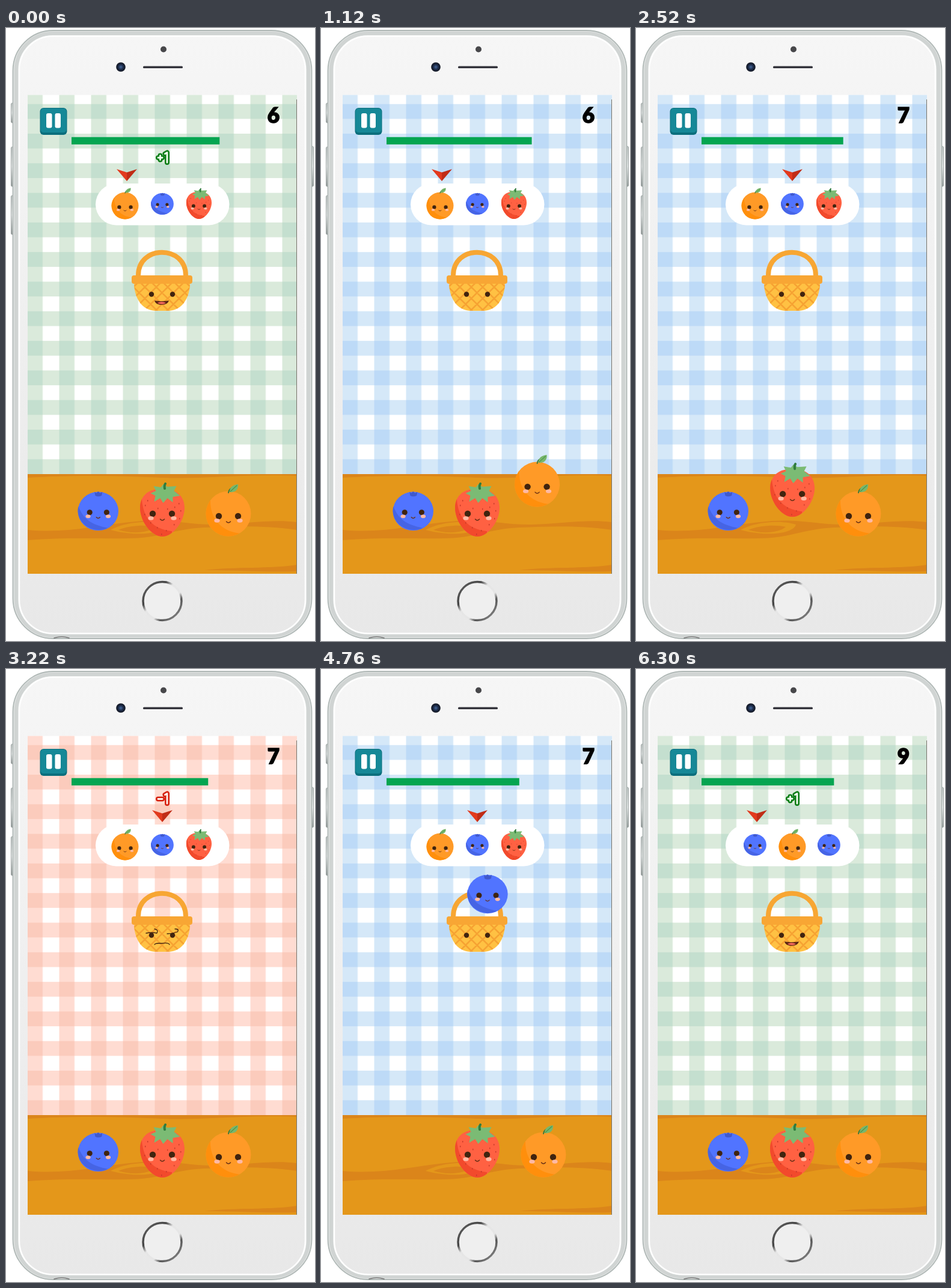
An HTML page that plays this animation: 514 px wide and 1021 px high, repeating every 6370 ms.

```html
<!DOCTYPE html>
<html lang="en">
<head>
<meta charset="utf-8">
<title>Fruit basket game</title>
<style>
html, body { margin: 0; width: 100%; height: 100%; overflow: hidden; background: #fff; }
svg { display: block; }
#game { --light: #d5e8f8; --dark: #bddaf7; }
#game.good { --light: #daeadb; --dark: #c4dfcf; }
#game.bad { --light: #ffdcd2; --dark: #fbcbbc; }
.good .happy, .bad .angry { visibility: visible; }
.happy, .angry { visibility: hidden; }
text { font-family: Lato, sans-serif; font-weight: 900; text-anchor: middle; }
.line { fill: none; stroke-linecap: round; stroke-linejoin: round; }
</style>
</head>
<body>
<svg id="game" width="514" height="1021" viewBox="0 0 514 1021">
<defs>
  <linearGradient id="face" x2="0" y2="1"><stop stop-color="#f6f6f6"/><stop offset="1" stop-color="#e8e8e8"/></linearGradient>
  <linearGradient id="ring" x2="1" y2="1">
    <stop stop-color="#666"/><stop offset=".3" stop-color="#444"/><stop offset=".42" stop-color="#e6e6e6"/>
    <stop offset=".62" stop-color="#e6e6e6"/><stop offset=".72" stop-color="#555"/><stop offset="1" stop-color="#999"/>
  </linearGradient>
  <linearGradient id="button" x2="0" y2="1"><stop stop-color="#bfc5c4"/><stop offset=".5" stop-color="#eceeee"/><stop offset="1" stop-color="#8b9291"/></linearGradient>
  <radialGradient id="lens"><stop stop-color="#46699c"/><stop offset=".55" stop-color="#1b2945"/><stop offset="1" stop-color="#11151f"/></radialGradient>
  <pattern id="gingham" x="35.5" y="126.7" width="53" height="49.3" patternUnits="userSpaceOnUse">
    <path d="M0 0H53V24.6H25.5V49.3H0z" style="fill:var(--light)"/>
    <path d="M0 0H25.5V24.6H0z" style="fill:var(--dark)"/>
  </pattern>
  <clipPath id="screen"><path d="M36 111.5H484V909H36z"/></clipPath>
  <path id="bowl" d="M213 424H306C306 448 294 471 269 471H250C225 471 213 448 213 424z"/>
  <clipPath id="bowlClip"><use href="#bowl"/></clipPath>
  <clipPath id="ball"><circle r="37.5"/></clipPath>
  <path id="berry" d="M0 -33C15 -39 37 -28 37 -4C37 20 17 44 0 44C-17 44 -37 20 -37 -4C-37 -28 -15 -39 0 -33z"/>
  <clipPath id="berryClip"><use href="#berry"/></clipPath>
  <path id="plus" d="M253 216h7M256.500 212.500v7"/>
  <path id="minus" d="M253 216.500h7"/>
  <path id="one" d="M264.500 209.500L268 207.500V224"/>

  <g id="smile">
    <circle cx="-16" r="5.2" fill="#40240f"/><circle cx="16" r="5.2" fill="#40240f"/>
    <ellipse cx="-19" cy="7.5" rx="4.6" ry="3.2" fill="#ffb9a4"/><ellipse cx="19" cy="7.5" rx="4.6" ry="3.2" fill="#ffb9a4"/>
    <path class="line" d="M-3.5 9Q0 13 3.5 9" stroke="#693016" stroke-width="1.5"/>
  </g>
  <g id="orange">
    <circle r="37.5" fill="#ff9a27"/>
    <path clip-path="url(#ball)" d="M-40 -24H-30C-31 8 -13 29 20 33V40H-40z" fill="#ff8f0c"/>
    <path class="line" d="M0 -35Q1 -41 6 -43" stroke="#3b7a3b" stroke-width="2"/>
    <path d="M2 -36C2 -45 8 -48 16 -49C17 -40 11 -35 2 -36z" fill="#78b76c"/>
    <path class="line" d="M3 -37L14 -47" stroke="#4e9550" stroke-width="1.3"/>
    <use href="#smile" y="4"/>
  </g>
  <g id="blueberry">
    <ellipse rx="33.700" ry="32.300" fill="#5174ff"/>
    <path d="M-33 -8C-24 14 -12 22 16 28C-8 39 -39 20 -33 -8z" fill="#4664e4"/>
    <path d="M-6 -32L-3 -30L0 -33L3 -30L7 -32L6 -26Q0 -23 -5 -26z" fill="#4059cc"/>
    <use href="#smile" transform="translate(0 2) scale(.88)"/>
  </g>
  <g id="strawberry">
    <use href="#berry" fill="#ff6142"/>
    <path clip-path="url(#berryClip)" d="M-40 -18H-34C-32 12 -16 32 16 35V46H-40z" fill="#f24a2c"/>
    <path id="seeds" fill="#c83a2a"/>
    <path transform="translate(1.500 -2)" d="M0 -41L7 -37L22 -38L18 -30L28 -22L16 -20L16 -11L7 -18L0 -10L-5 -18L-15 -12L-13 -22L-21 -26L-12 -30L-16 -38L-4 -36z" fill="#7bbb74"/>
    <path class="line" d="M4 -36Q3 -41 5 -44" stroke="#2f7c3e" stroke-width="4"/>
    <use href="#smile" y="6"/>
  </g>
</defs>

<g id="phone">
  <g fill="url(#button)" stroke="#9ba3a2">
    <rect x="8.500" y="125" width="6" height="33" rx="2"/><rect x="8.500" y="198" width="6" height="66" rx="2"/>
    <rect x="8.500" y="279" width="6" height="65" rx="2"/><rect x="505.500" y="197" width="6" height="67" rx="2"/>
  </g>
  <rect x="11.500" y="4" width="497" height="1013" rx="67" fill="#dfe2e1" stroke="#b0b8b6" stroke-width="1.800"/>
  <rect x="17" y="9" width="486" height="1003" rx="61" fill="none" stroke="#d0d4d3" stroke-width="6"/>
  <rect x="22" y="13.500" width="476" height="995" rx="56" fill="url(#face)" stroke="#fff" stroke-width="2.600"/>
  <path class="line" d="M80 1016Q93 1012 105 1016" stroke="#777" stroke-width="1.500"/>
  <circle cx="262" cy="35.500" r="5" fill="#47474a"/>
  <circle cx="191" cy="65" r="7.800" fill="url(#lens)"/>
  <rect x="228" y="63.500" width="66" height="3.500" rx="1.500" fill="#34343c"/>
  <circle cx="260" cy="954.500" r="32" fill="#efefef" stroke="url(#ring)" stroke-width="3.500"/>
</g>

<g clip-path="url(#screen)">
  <path d="M36 111H484V744H36z" fill="#fff"/>
  <path d="M36 111H484V744H36z" fill="url(#gingham)"/>
  <path d="M36 743H484V909H36z" fill="#e4971a"/>
  <g fill="#db851a">
    <path d="M36 743H484V746C400 742 330 752 260 749S120 744 36 749z"/>
    <path d="M36 836C100 842 150 829 205 823C270 815 300 828 350 827S440 818 484 823V836C430 828 380 830 330 832C280 834 255 850 205 850C150 851 100 848 36 853z"/>
    <path d="M330 903C380 897 440 901 484 894V905C440 907 390 903 330 903z"/>
  </g>
  <path d="M174 836C194 824 238 818 266 827C263 840 225 849 174 836z" fill="#e4971a"/>
  <path d="M187 836C205 828 235 827 249 831C238 841 209 843 187 836z" fill="#db851a"/>
  <path d="M483.500 119V909" stroke="#77736a"/>

  <rect x="56.500" y="133" width="45" height="45" rx="6" fill="#0c6f7d"/>
  <rect x="57.500" y="134" width="43" height="40" rx="5" fill="#168897"/>
  <path d="M67 145q0-3 3-3h3.500q3 0 3 3v18.500q0 3-3 3H70q-3 0-3-3zM81.500 145q0-3 3-3H88q3 0 3 3v18.500q0 3-3 3h-3.500q-3 0-3-3z" fill="#fff"/>
  <rect id="bar" x="109" y="181.700" height="12.200" fill="#05a551"/>
  <text id="score" x="445" y="157.500" font-size="35" stroke="#000" stroke-width="1.400"></text>

  <g class="happy line">
    <g stroke="#0a7d16" stroke-width="8"><use href="#plus"/><use href="#one"/></g>
    <g stroke="#f4fff2" stroke-width="2.800"><use href="#plus"/><use href="#one"/></g>
  </g>
  <g class="angry line">
    <g stroke="#d6200e" stroke-width="8"><use href="#minus"/><use href="#one"/></g>
    <g stroke="#fff3ef" stroke-width="2.800"><use href="#minus"/><use href="#one"/></g>
  </g>

  <g id="arrow">
    <path d="M-17 235L0 240.500V255z" fill="#e2391d"/><path d="M17 235L0 240.500V255z" fill="#c02c16"/>
  </g>
  <rect x="149" y="259" width="222.500" height="69.500" rx="34.700" fill="#fff"/>
  <g id="order"></g>

  <path d="M220 415V412C220 361 299 361 299 412V415" fill="none" stroke="#f7a633" stroke-width="8"/>
  <use href="#bowl" fill="#ffc143"/>
  <path id="weave" class="line" clip-path="url(#bowlClip)" stroke="#f6a232" stroke-width="2.600"/>
  <rect x="209" y="412" width="101" height="14" rx="4" fill="#f8a634"/>
  <g fill="#40240f"><circle cx="242" cy="443.500" r="4.200"/><circle cx="277" cy="443.500" r="4.200"/></g>
  <g class="happy">
    <path d="M247 454Q259 456 271 454Q269 461 259 461T247 454z" fill="#5b2513"/>
    <path d="M252 458Q259 454 266 458Q260 462 252 458z" fill="#f0685a"/>
  </g>
  <g class="angry line" stroke="#40240f" stroke-width="1.300">
    <path d="M247 459Q249 456 259 457Q270 455 272 459M233 440Q243 438 251 440Q254 434 247 433M268 441Q276 441 285 438Q289 433 281 433"/>
  </g>
  <g id="table"></g>
</g>
</svg>
<script>
const LOOP = 6370, STEP = 70, FEEDBACK = 490;
const $ = id => document.getElementById(id);
const game = $('game');

const homes = { blueberry: [153.3, 804.8], strawberry: [260, 803], orange: [370, 809] };
const slots = { blueberry: [293, .56], strawberry: [293, .57], orange: [296, .6] };

// Each drag: fruit, then points of [time, x, y]; the fruit is back home afterwards.
const drags = [
  ['orange', [980, ...homes.orange], [1680, 270, 339], [1820, 260, 405]],
  ['strawberry', [2450, ...homes.strawberry], [2870, 262, 360], [3010, 260, 410]],
  ['blueberry', [4200, ...homes.blueberry], [4760, 277, 375], [4900, 261, 412]],
  ['strawberry', [5320, ...homes.strawberry], [5880, 217, 340], [6090, 257, 405]]
];
// Each stage: start, score, arrow x, mood, bar offset
const stages = [
  [-70, 6, 201, 'good', 0],
  [1820, 7, 260, 'good', 0],
  [3010, 7, 260, 'bad', -5.5],
  [4900, 8, 322, 'good', -5.5],
  [6090, 9, 201, 'good', .5]
];

const fruit = (name, x, y, scale) =>
  `<use href="#${name}" transform="translate(${x} ${y}) scale(${scale})"/>`;
const orderOf = names => names.map((name, i) =>
  fruit(name, [198, 260, 321][i], ...slots[name])).join('');
const orders = [
  orderOf(['orange', 'blueberry', 'strawberry']),
  orderOf(['blueberry', 'orange', 'blueberry'])
];

$('seeds').setAttribute('d', [
  [-29, -9], [-25, -17], [27, -12], [30, 0], [20, -6], [-8, -4], [8, -3], [-30, 6],
  [-20, 20], [-9, 28], [6, 33], [19, 23], [28, 13], [-2, 39]
].map(([x, y]) => `M${x} ${y}v2.400h1.400v-2.400z`).join(''));

let weave = '';
for (let x = 164.5; x < 360; x += 19) weave += `M${x} 422l50 50M${x} 422l-50 50`;
$('weave').setAttribute('d', weave);

$('table').innerHTML = Object.keys(homes).map(name => `<use id="t-${name}" href="#${name}"/>`).join('');

function along(points, t) {
  const i = points.findIndex((p, n) => n && t < p[0]);
  const [t0, x0, y0] = points[i - 1], [t1, x1, y1] = points[i];
  const u = (t - t0) / (t1 - t0), e = u * u * (3 - 2 * u);
  return [x0 + (x1 - x0) * e, y0 + (y1 - y0) * e];
}

let shownOrder = -1;
function draw(t) {
  const [start, score, arrowX, mood, offset] = stages.filter(s => s[0] <= t).pop();
  const order = score === 9 ? 1 : 0;
  game.setAttribute('class', t - start < FEEDBACK ? mood : '');
  $('score').textContent = score;
  $('arrow').setAttribute('transform', `translate(${arrowX})`);
  $('bar').setAttribute('width', 246.3 - t * .0042 + offset);
  if (order !== shownOrder) $('order').innerHTML = orders[shownOrder = order];

  const drag = drags.find(([, ...p]) => t >= p[0][0] && t < p[p.length - 1][0]);
  for (const name in homes) {
    const [x, y] = drag && drag[0] === name ? along(drag.slice(1), t) : homes[name];
    $('t-' + name).setAttribute('transform', `translate(${x} ${y})`);
  }
}

const began = performance.now();
function tick() {
  const t = (performance.now() - began) % LOOP;
  draw(Math.floor(t / STEP) * STEP);
  requestAnimationFrame(tick);
}
tick();
</script>
</body>
</html>
```
